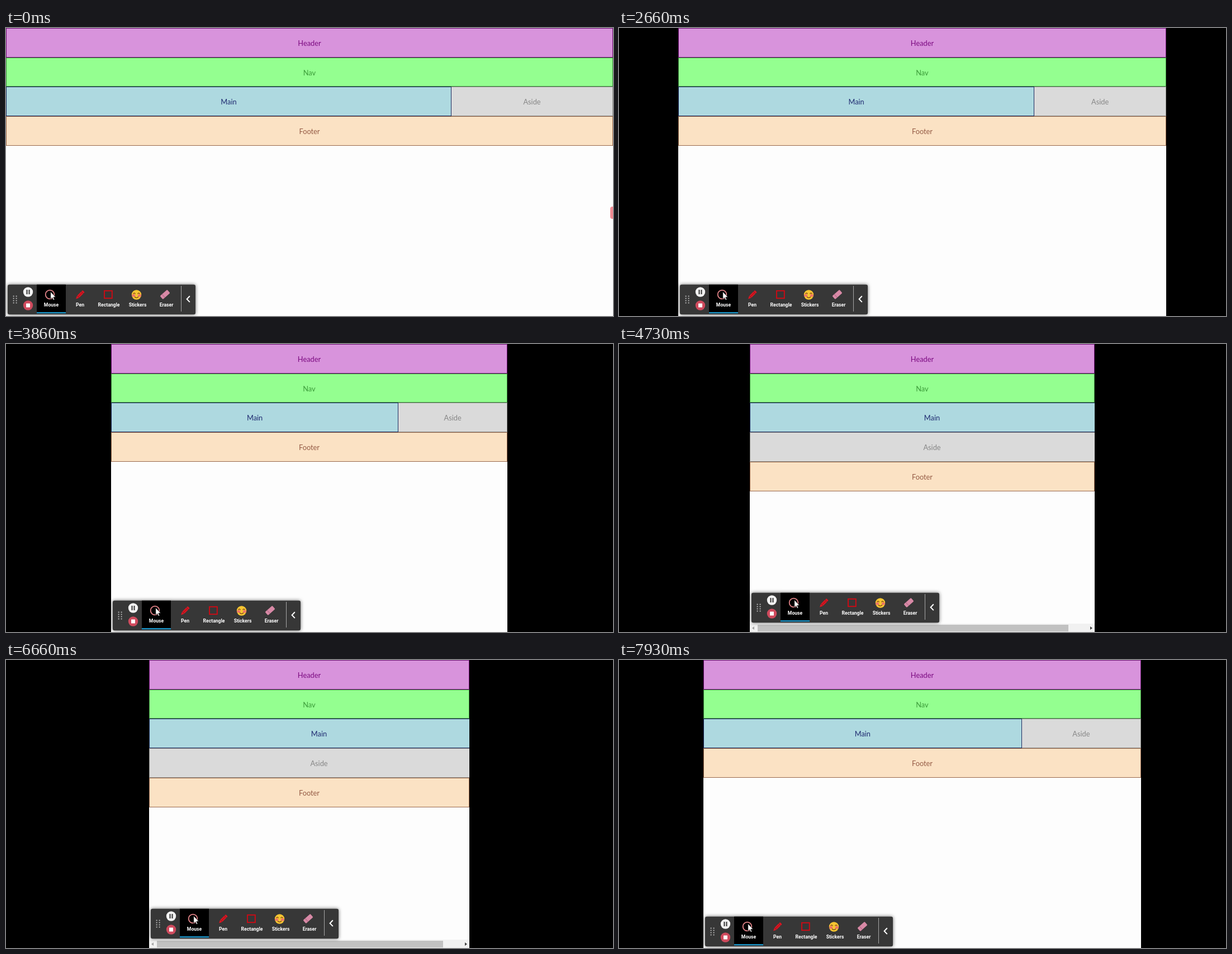
An HTML page for the animation above (8 s loop, 1086 by 516 pixels).

```html
<!DOCTYPE html>
<html lang="en">
<head>
<meta charset="utf-8">
<title>Responsive layout</title>
<style>
  html, body { margin: 0; width: 100%; height: 100%; overflow: hidden; background: #000; }
  #page { position: absolute; top: 0; height: 516px; overflow: hidden; background: #fdfdfd; }
  .row {
    position: absolute; box-sizing: border-box; border: 1px solid;
    display: flex; align-items: center; justify-content: center;
    font: 12.8px Lato, "Open Sans", sans-serif;
  }
  .row span { position: relative; top: .5px; }
  #header { background: #d893dc; border-color: #6c0f72; color: #7b0a80; }
  #nav { background: #94ff90; border-color: #3a8a3a; color: #3a9a38; }
  #main { background: #aed9e0; border-color: #1d2a5e; color: #1f2a70; }
  #aside { background: #dadada; border-color: #8c8c88; color: #868686; }
  #footer { background: #fbe2c4; border-color: #98684c; color: #945a44; }
  #tab { position: absolute; top: 320px; width: 12px; height: 22px; border-radius: 4px; background: #f28b93; }
  #tools { position: absolute; left: 0; top: 450px; overflow: visible; filter: drop-shadow(0 0 3px rgba(0, 0, 0, .6)); }
  #tools text { font: bold 8.6px Roboto, "Open Sans", sans-serif; fill: #fff; text-anchor: middle; }
  #bar { position: absolute; left: 0; bottom: 0; width: 100%; height: 15px; background: #f1f1f1; }
  #thumb { position: absolute; left: 14px; top: 2px; height: 11.5px; background: #c1c1c1; }
  .arrow { position: absolute; top: 4.5px; border: 3.5px solid transparent; }
  #prev { left: 1px; border-right: 4px solid #a3a3a3; }
  #next { right: 1px; border-left: 4px solid #404040; }
</style>
</head>
<body>
<div id="page">
  <div class="row" id="header"><span>Header</span></div>
  <div class="row" id="nav"><span>Nav</span></div>
  <div class="row" id="aside"><span>Aside</span></div>
  <div class="row" id="main"><span>Main</span></div>
  <div class="row" id="footer"><span>Footer</span></div>
  <div id="tab"></div>
  <div id="bar">
    <div class="arrow" id="prev"></div>
    <div id="thumb"></div>
    <div class="arrow" id="next"></div>
  </div>
  <svg id="tools" width="345" height="66">
    <rect x="3" y="9.7" width="336" height="53.6" rx="3" fill="#373737"/>
    <g id="grip" fill="#c4c4c4"></g>
    <circle cx="39.5" cy="23" r="8.7" fill="#f2f2f2"/>
    <path d="M37.5 19v8M41.5 19v8" stroke="#333" stroke-width="2"/>
    <circle cx="39.5" cy="47" r="8.7" fill="#cf4a5d"/>
    <rect x="36" y="43.5" width="7" height="7" rx=".5" fill="#fff"/>
    <rect x="55" y="9.7" width="52" height="51.5" fill="#000"/>
    <rect x="55" y="59.2" width="52" height="2" fill="#1ba4de"/>
    <circle cx="78.5" cy="27.5" r="7.8" fill="none" stroke="#e5858a" stroke-width="1.8"/>
    <path d="M79.8 22.5v13.2l3-2.7 2 4.6 2-.9-2-4.4h4z" fill="#fff" stroke="#000" stroke-width=".7"/>
    <g transform="translate(132.5 28) rotate(45)" fill="#dc1420">
      <rect x="-2.6" y="-9" width="5.2" height="3" rx="1"/>
      <rect x="-2.6" y="-5.4" width="5.2" height="10"/>
      <path d="M-2.6 5.2h5.2L0 10.5z"/>
      <path d="M0-5v9" stroke="#8c0c14" stroke-width=".8"/>
    </g>
    <rect x="176" y="20.8" width="13.8" height="13.4" fill="none" stroke="#cf0a14" stroke-width="1.9"/>
    <circle cx="233.5" cy="28" r="8.7" fill="#f6c531"/>
    <g fill="#ee7467">
      <ellipse cx="228.2" cy="29.3" rx="3" ry="2.2"/>
      <ellipse cx="238.8" cy="29.3" rx="3" ry="2.2"/>
    </g>
    <path d="M227.5 26.4q2-3 4 0M235.5 26.4q2-3 4 0M230 31.5q3.5 3.6 7 0" fill="none" stroke="#7a3a1c" stroke-width="1.3"/>
    <g transform="translate(284.5 27.5) rotate(-41)">
      <rect x="-8.6" y="-4" width="17.2" height="8" rx="1.5" fill="#d889a6"/>
      <path d="M-3.6-4v8" stroke="#b06a86"/>
    </g>
    <path d="M313.5 12v46" stroke="#a6a6a6"/>
    <path d="M328.8 30.3l-5.2 5.4 5.2 5.4" fill="none" stroke="#fff" stroke-width="2"/>
  </svg>
</div>
<script>
  const LOOP = 8000, FPS = 15;
  const BREAK = 640;      // below this width the aside wraps
  const EXTRA = 35;       // overflow of wrapped boxes
  // [step, left edge of the viewport]
  const EDGE = [
    [13, 0], [23, 56], [26, 61], [27, 61], [37, 90], [39, 90], [40, 106],
    [44, 106], [56, 177], [57, 177], [58, 188], [70, 230], [71, 234], [73, 234],
    [85, 270], [93, 270], [100, 256], [106, 234], [119, 151]
  ];
  const TOPS = [0, 53, 105, 158, 210.5, 263.5];
  const $ = id => document.getElementById(id);
  const svgNS = "http://www.w3.org/2000/svg";

  function addSvg(parent, tag, attrs, text = "") {
    const el = document.createElementNS(svgNS, tag);
    for (const key in attrs) el.setAttribute(key, attrs[key]);
    el.textContent = text;
    parent.append(el);
  }

  ["Mouse", "Pen", "Rectangle", "Stickers", "Eraser"].forEach((name, i) =>
    addSvg($("tools"), "text", { x: 81 + 51.5 * i, y: 49.3 }, name));
  for (let i = 0; i < 8; i++)
    addSvg($("grip"), "circle", { cx: 13.6 + i % 2 * 5, cy: 30.5 + (i >> 1) * 4, r: 1.1 });

  function edgeAt(step) {
    if (step <= EDGE[0][0]) return EDGE[0][1];
    for (let i = 1; i < EDGE.length; i++) {
      const [s0, x0] = EDGE[i - 1], [s1, x1] = EDGE[i];
      if (step <= s1) return Math.round(x0 + (x1 - x0) * (step - s0) / (s1 - s0));
    }
    return EDGE[EDGE.length - 1][1];
  }

  function place(id, row, left, width) {
    const s = $(id).style;
    s.left = left + "px";
    s.width = width + "px";
    s.top = TOPS[row] + "px";
    s.height = TOPS[row + 1] - TOPS[row] + "px";
  }

  function draw(t) {
    const step = Math.floor((t + 7) * FPS / 1000);
    const x = edgeAt(step);
    const w = x ? 1085 - 2 * x : 1086;
    const narrow = w < BREAK;

    $("page").style.left = x + "px";
    $("page").style.width = w + "px";
    place("header", 0, 0, w);
    place("nav", 1, 0, w);
    if (narrow) {
      place("main", 2, 0, w + EXTRA);
      place("aside", 3, 0, w + EXTRA);
    } else {
      const mainW = w * .75 - EXTRA / 2;
      place("main", 2, 0, mainW);
      place("aside", 2, mainW - 1, w - mainW + 1);
    }
    place("footer", narrow ? 4 : 3, 0, w);

    $("tools").style.top = (narrow ? 435.5 : 450) + "px";
    $("bar").style.display = narrow ? "block" : "none";
    $("thumb").style.width = (w - 28) * w / (w + EXTRA) - 1.5 + "px";

    const peek = Math.max(1, 5 - step * 2 / 3);
    $("tab").style.left = w - peek + "px";
    $("tab").style.display = step < 27 ? "block" : "none";
  }

  const start = performance.now();
  function tick() {
    draw((performance.now() - start) % LOOP);
    requestAnimationFrame(tick);
  }
  tick();
</script>
</body>
</html>
```
